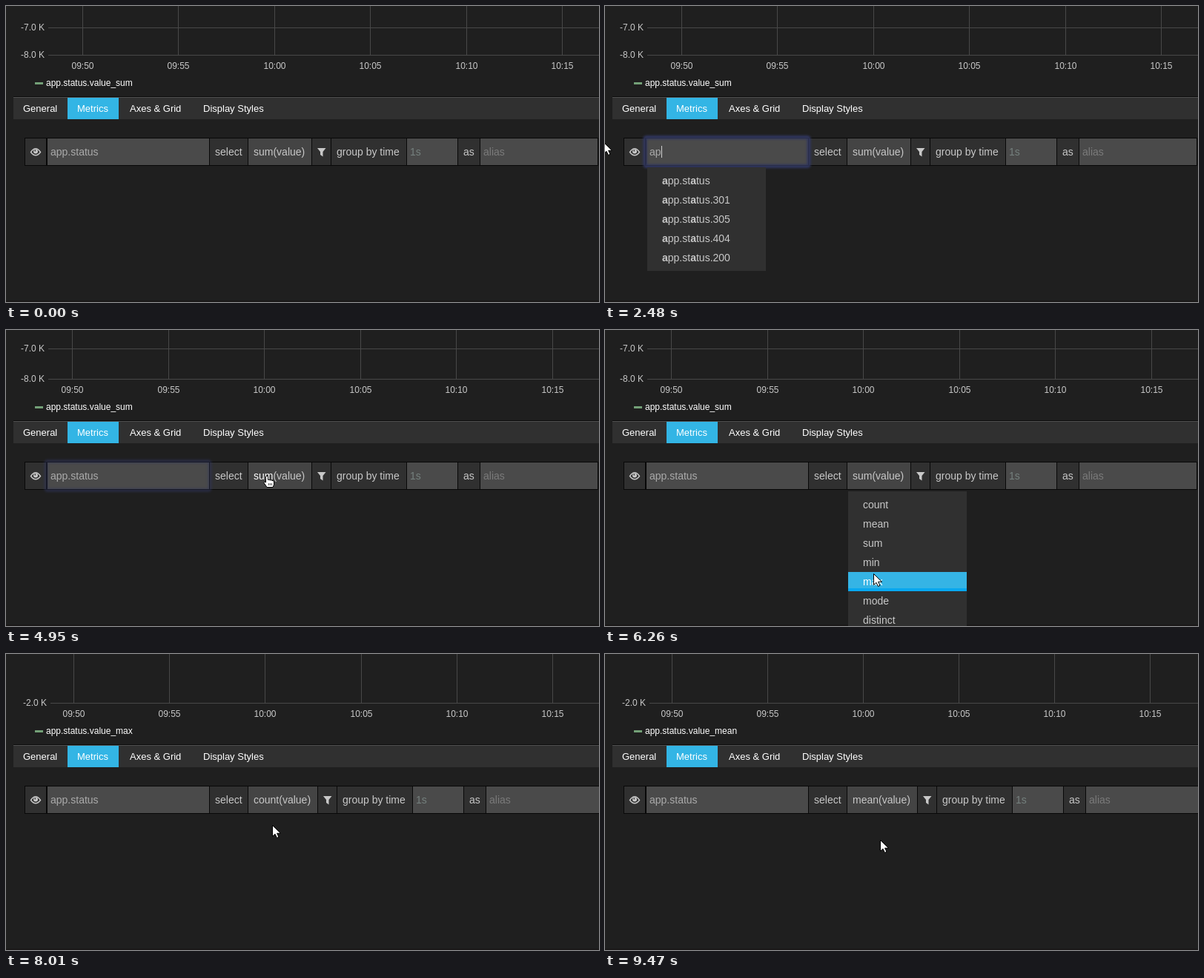
Recreate the animation shown at these times as an HTML page. Size 800 by 400 pixels, loop 9.57 s.

```html
<!DOCTYPE html>
<html lang="en">
<head>
<meta charset="utf-8">
<title>Metric query editor</title>
<style>
  html, body { margin: 0; width: 100%; height: 100%; overflow: hidden; background: #1f1f1f; }
  svg { display: block; font-family: "Liberation Sans", Arial, sans-serif; }
</style>
</head>
<body>
<svg id="stage" width="800" height="400" viewBox="0 0 800 400"></svg>
<script>
const LOOP = 9570;
const stage = document.getElementById('stage');

// Each entry holds from its start time on.
const charts = [
  { at: 0, fn: 'sum', left: 57, x: 103, step: 129.4, ticks: [['-7.0 K', 29], ['-8.0 K', 66]] },
  { at: 3560, fn: 'sum', left: 57, x: 89, step: 129.6, ticks: [['-7.0 K', 25], ['-8.0 K', 66]] },
  { at: 6420, fn: 'max', left: 60, x: 91, step: 129.2, ticks: [['-2.0 K', 66]] },
  { at: 8090, fn: 'count', left: 55, x: 89, step: 129.4, ticks: [['0.990', 66]] },
  { at: 9430, fn: 'mean', left: 60, x: 90, step: 129, ticks: [['-2.0 K', 66]] }
];
const selects = [
  { at: 0, fn: 'sum', shift: 0 },
  { at: 6300, fn: 'max', shift: 0 },
  { at: 7930, fn: 'count', shift: 8 },
  { at: 9270, fn: 'mean', shift: 9 }
];
// Pointer moves: start, end, target x, target y
const moves = [
  [690, 970, 164, 190],
  [1290, 1770, -2, 184],
  [4050, 4490, 386, 196],
  [4530, 4710, 352, 197],
  [5070, 5750, 362, 300],
  [5890, 6250, 362, 329],
  [6420, 6820, 356, 211],
  [7010, 7630, 359, 231],
  [8130, 8420, 355, 210],
  [8700, 9230, 371, 251]
];
const menuTimes = [[4990, 6300], [6970, 7930], [8600, 9270]];
const functions = ['count', 'mean', 'sum', 'min', 'max', 'mode', 'distinct'];
const metrics = ['', '.301', '.305', '.404', '.200'].map(s => 'app.status' + s);

const current = (list, t) => list.filter(e => e.at <= t).pop();
const within = (v, a, b) => v >= a && v < b;
const clamp = v => Math.max(0, Math.min(1, v));

const rect = (x, y, w, h, fill, more = '') =>
  `<rect x="${x}" y="${y}" width="${w}" height="${h}" fill="${fill}" ${more}/>`;
const text = (x, y, s, size = 14, fill = '#c8c8c8', anchor = 'start') =>
  `<text x="${x}" y="${y}" font-size="${size}" fill="${fill}" text-anchor="${anchor}">${s}</text>`;

function pointerAt(t) {
  let x = 690, y = 386;
  for (const [start, end, tx, ty] of moves) {
    if (t < start) break;
    const p = clamp((Math.floor((t - start) / 40) + 1) * 40 / (end - start + 40));
    const e = p * p * (3 - 2 * p);
    x += (tx - x) * e;
    y += (ty - y) * e;
  }
  return { x: Math.round(x), y: Math.round(y), shown: t >= 690 };
}

function drawChart({ fn, left, x, step, ticks }) {
  let out = '';
  for (const [label, y] of ticks)
    out += rect(left, y, 800 - left, 1, '#484848') + text(left - 5, y + 4, label, 12, '#c8c8c8', 'end');
  ['09:50', '09:55', '10:00', '10:05', '10:10', '10:15'].forEach((label, i) => {
    const gx = Math.round(x + i * step);
    out += rect(gx, 0, 1, 67, '#484848') + text(gx + .5, 85, label, 12, '#c8c8c8', 'middle');
  });
  return out + rect(39, 103, 11, 3, '#73a077') + text(54, 108, 'app.status.value_' + fn, 12, '#fff');
}

function drawTabs() {
  return rect(10, 122, 790, 1, '#0c0c0c') + rect(10, 123, 790, 30, '#303030') +
    rect(10, 123, 790, 1, '#505050') + rect(83, 124, 69, 29, '#33b5e5') +
    [[23, 'General'], [96, 'Metrics'], [167, 'Axes &amp; Grid'], [266, 'Display Styles']]
      .map(([x, s]) => text(x, 143, s, 13, '#fff')).join('');
}

function drawInput(t) {
  let out = '';
  const glow = clamp((t - 1250) / 160) * clamp(1 - (t - 4870) / 160);
  if (t >= 1290 && glow > 0)
    out += `<g fill="none" opacity="${glow}">
      <rect x="54" y="177.500" width="221" height="39" rx="2" stroke="#30365f" stroke-width="5" style="filter:blur(1.800px)"/>
      <rect x="54.500" y="178.500" width="220" height="37" stroke="#292d48"/></g>`;
  const typing = within(t, 2350, 3470);
  const value = !typing ? 'app.status' : t < 2480 ? 'a' : 'ap';
  if (within(t, 1290, 2350)) {
    const from = Math.max(60, Math.min(126, pointerAt(t).x));
    out += rect(from, 189, 126 - from, 16, '#3390ff');
  }
  out += text(60, 202, value, 14, '#ababab');
  if (typing) out += rect(60 + 8 * value.length, 189, 1, 16, '#d0d0d0');
  return out;
}

function drawQuery(t, pointer) {
  const { fn, shift } = current(selects, t);
  const hover = pointer.shown && within(pointer.x, 327, 412 + shift) && within(pointer.y, 179, 216);
  const cell = (x, end, fill) => rect(x, 179, end - x, 36, fill);
  const dark = '#303030', field = '#4a4a4a';
  return rect(25, 178, 774 + shift, 38, '#080808') +
    cell(26, 54, dark) + cell(56, 274, field) + cell(275, 326, dark) + cell(327, 412 + shift, '#444') +
    `<g fill="none" stroke="#c8c8c8" stroke-width="1.400"><path d="M33.500 197.500Q40 188 46.500 197.500Q40 206 33.500 197.500Z"/></g>
     <circle cx="40" cy="196.500" r="3" fill="#c8c8c8"/><circle cx="39.300" cy="195.500" r="1" fill="#303030"/>` +
    text(282, 202, 'select') +
    text(334, 202, `<tspan fill="${hover ? '#fff' : '#c8c8c8'}">${fn}</tspan>(value)`) +
    `<g transform="translate(${shift} 0)">` +
    cell(413, 438, dark) + cell(439, 540, dark) + cell(541, 609, field) + cell(610, 639, dark) + cell(640, 798, field) +
    '<path d="M420 192H431.500L427.500 197V203.500L424 201V197Z" fill="#c8c8c8"/>' +
    text(446, 202, 'group by time') + text(545, 202, '1s', 14, '#75807e') +
    text(617, 202, 'as') + text(644, 202, 'alias', 14, '#7b7b7b') + '</g>' +
    drawInput(t);
}

function drawMenu(x, items, active) {
  return rect(x, 218, 160, 10 + items.length * 26, '#303030') + items.map((s, i) => {
    const y = 223 + i * 26, on = i === active;
    return (on ? rect(x, y, 160, 26, '#35b4e5') + rect(x, y + 22, 160, 4, '#08a8f0') : '') +
      text(x + 20, y + 18, s, 14, on ? '#fff' : '#c8c8c8');
  }).join('');
}

function drawMenus(t, { x, y }) {
  if (within(t, 2350, 3470)) {
    const matched = t >= 2990;
    const bold = s => s.replace(matched ? /ap/g : /a/g, '<tspan font-weight="bold">$&</tspan>');
    return drawMenu(57, metrics.map(bold), matched ? 0 : -1);
  }
  if (!menuTimes.some(([a, b]) => within(t, a, b))) return '';
  return drawMenu(328, functions, within(x, 328, 488) ? Math.floor((y - 223) / 26) : -1);
}

function drawPointer({ x, y, shown }) {
  if (!shown) return '';
  const inRow = within(y, 179, 207);
  let shape = '<path d="M.5 .5V15.500L4 12.300L6.500 17.500L9 16.300L6.600 11.300H11.500Z" fill="#fff" stroke="#000" stroke-linejoin="round"/>';
  if (inRow && within(x, 56, 274))
    shape = '<path d="M-3-7.500H-1L0-6.500L1-7.500H3M0-6.500V6.500M-3 7.500H-1L0 6.500L1 7.500H3" fill="none" stroke="#ddd" stroke-width="1.200"/>';
  else if (inRow && within(x, 327, 412))
    shape = '<path d="M-1.500 1Q0-1 1.500 1V5.500Q3 4.500 4.500 6Q6 5 7 6.500Q9 6 9.500 8V12L8 15.500H0L-4 9.500Q-3.500 7-1.500 9Z" fill="#fff" stroke="#000"/><path d="M2.500 10V13M4.500 10V13M6.500 10V13" stroke="#222" stroke-width=".800"/>';
  return `<g transform="translate(${x} ${y})">${shape}</g>`;
}

function render(t) {
  const pointer = pointerAt(t);
  stage.innerHTML = rect(0, 0, 800, 400, '#1f1f1f') + rect(0, 398, 800, 2, '#1a1919') +
    drawChart(current(charts, t)) + drawTabs() + drawQuery(t, pointer) +
    drawMenus(t, pointer) + drawPointer(pointer);
}

const began = performance.now();
function tick() {
  render((performance.now() - began) % LOOP);
  requestAnimationFrame(tick);
}
tick();
</script>
</body>
</html>
```
